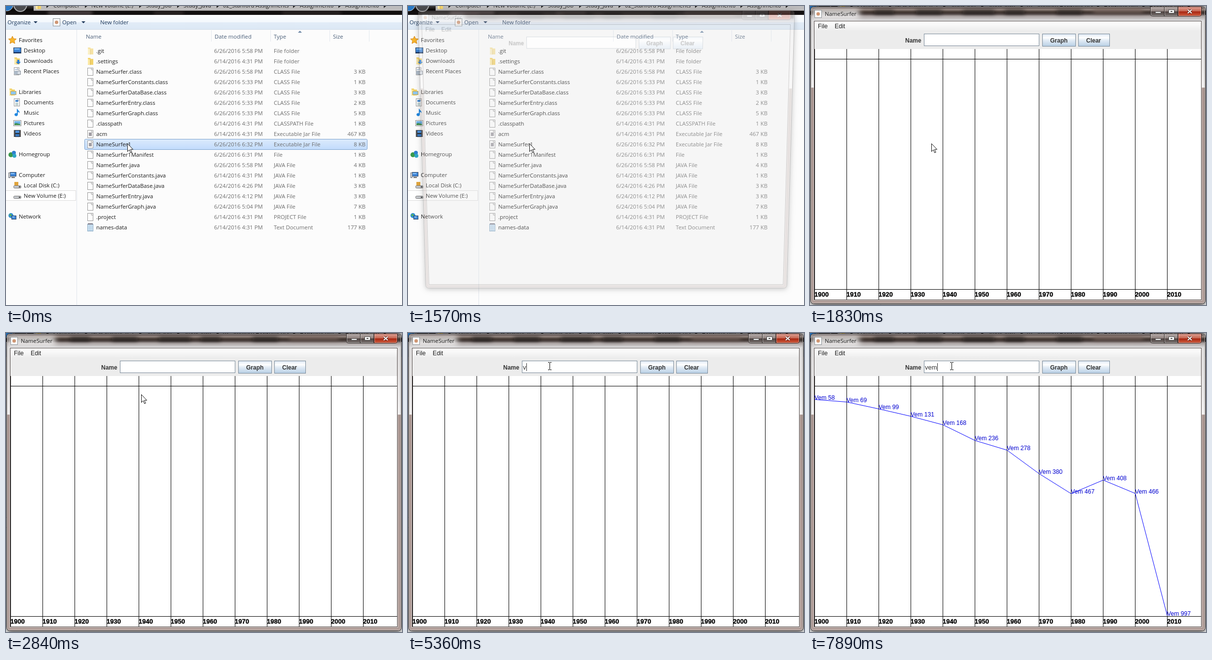
An HTML page that plays this animation: 803 px wide and 605 px high, repeating every 8000 ms.

```html
<!DOCTYPE html>
<html lang="en">
<head>
<meta charset="utf-8">
<title>Name graph</title>
<style>
html, body { margin: 0; width: 100%; height: 100%; overflow: hidden; background: #fcfcfc; }
svg { position: absolute; left: 0; top: 0; width: 803px; height: 605px; overflow: hidden; }
#win { overflow: visible; transform-origin: 401px 302px; filter: drop-shadow(0 2px 6px rgba(0,0,0,.75)); }
text { font: 11.3px "Open Sans", "Noto Sans", sans-serif; fill: #1c1c1c; white-space: pre; }
.dim { fill: #6d6d6d; }
.head { fill: #4c607a; }
.tool { fill: #1e395b; }
.java { font: 12.3px "Liberation Sans", Arial, sans-serif; }
.bold { font: bold 12px "Liberation Sans", Arial, sans-serif; fill: #333; }
.year { font: bold 13px "Liberation Sans", Arial, sans-serif; fill: #000; stroke: #000; stroke-width: .3; }
.rank { font: 12.2px "Liberation Sans", Arial, sans-serif; fill: #0000d0; }
.field { font: 13px "Liberation Sans", Arial, sans-serif; fill: #333; }
</style>
</head>
<body>
<svg id="desk" viewBox="0 0 803 605"></svg>
<svg id="win" viewBox="0 0 803 605"></svg>
<svg id="top" viewBox="0 0 803 605"></svg>
<script>
const LOOP = 8000;
const $ = id => document.getElementById(id);

const rect = (x, y, w, h, fill, more = '') =>
  `<rect x="${x}" y="${y}" width="${w}" height="${h}" fill="${fill}" ${more}/>`;
const box = (x, y, w, h, fill, line, more = '') =>
  rect(x + .5, y + .5, w - 1, h - 1, fill, `stroke="${line}" ${more}`);
const text = (x, y, s, cls = '', more = '') => `<text x="${x}" y="${y}" class="${cls}" ${more}>${s}</text>`;
const path = (d, fill, more = '') => `<path d="${d}" fill="${fill}" ${more}/>`;
const dot = (x, y, r, fill, more = '') => `<circle cx="${x}" cy="${y}" r="${r}" fill="${fill}" ${more}/>`;
const line = (d, color, w = 1, more = '') => path(d, 'none', `stroke="${color}" stroke-width="${w}" ${more}`);
const at = (x, y, s) => `<g transform="translate(${x} ${y})">${s}</g>`;
const grad = (id, ...stops) => `<linearGradient id="${id}" x2="0" y2="1">` +
  stops.map(([o, c]) => `<stop offset="${o}" stop-color="${c}"/>`).join('') + '</linearGradient>';
const blur = (id, r) =>
  `<filter id="${id}" x="-50%" y="-100%" width="200%" height="300%"><feGaussianBlur stdDeviation="${r}"/></filter>`;

// 16 px icons, drawn from their top left corner
const page = (w = 12) => box(1, 0, w, 16, '#fdfdfd', '#9a9a9a') + line(`M${w - 3} .5v3.5h3.5`, '#9a9a9a');
const folder = (c = '#f3d36b') => path('M2 1h5l1 2h5v12H2z', c) + path('M2 3l5 2v11l-5-2z', '#fbe9a5') +
  line('M7 5v10', '#d6ad45');
const screen = (x, y, w, h) => box(x, y, w, h, '#3f86d8', '#33475f') + rect(x + 2, y + 2, w - 6, 2, '#8cc4f5');
const drive = box(0, 8, 16, 6, '#c5c8cc', '#777', 'rx="2"') + rect(11, 10, 3, 2, '#3a3a3a');
const icons = {
  page: page(),
  folder: folder(),
  pale: `<g opacity=".6">${folder()}</g>`,
  jar: page() + rect(4, 5, 6, 7, '#a09da3'),
  notes: box(1, 1, 12, 15, '#dcecf8', '#7fa3c0') + line('M3 4.5h8M3 7.5h8M3 10.5h8M3 13.5h8', '#8db4d3') +
    line('M2 1h10', '#667', 2),
  star: path('M8 0l2.3 5 5.7.6-4.2 3.9 1.2 5.5-5-2.8-5 2.8 1.2-5.5L0 5.6 5.7 5z', '#f8b62c', 'stroke="#d98a1b"'),
  desktop: screen(0, 2, 16, 12) + rect(1, 11, 14, 2, '#1d3f77'),
  down: folder() + path('M8 6h4v4h3l-5 5-5-5h3z', '#2b7cd3'),
  recent: page(11) + line('M3 4.5h6M3 7.5h6', '#7ba0c8') + box(5, 7, 10, 8, '#d5dbe2', '#8a939c') + dot(5, 11, 4, '#aebac7'),
  library: folder() + box(4, 6, 12, 8, '#8fc6ee', '#d2a93f'),
  doc: page() + rect(4, 3, 6, 4, '#4b8cd0') + line('M4 9.5h6M4 11.5h6M4 13.5h6', '#8aa'),
  music: path('M8 0c1 4 6 4 4 9-1-3-3-3-3-3v6a3.4 3 0 1 1-2-3V0z', '#2187e0'),
  picture: box(0, 2, 16, 12, '#fff', '#8a8a8a') + rect(2, 4, 12, 8, '#6fb4e8') + path('M2 12v-3l4-1 8 2v2z', '#3d8a4a'),
  video: rect(1, 1, 14, 14, '#28292c') + rect(4, 2, 8, 5, '#4c8fd8') + rect(4, 9, 8, 5, '#3b78bd') +
    line('M2.5 2v13M13.5 2v13', '#ddd', 1, 'stroke-dasharray="1.5"'),
  group: dot(5, 9, 5, '#3b9a4b') + dot(11, 5, 4, '#2f7fd0') + dot(12, 11, 4, '#2ea6c4'),
  computer: screen(3, 2, 13, 9) + box(0, 3, 4, 11, '#d4d8dd', '#70757c') + rect(6, 12, 7, 2, '#666'),
  disk: rect(2, 1, 8, 7, '#e0a43c') + drive,
  drive,
  network: dot(5, 6, 5, '#2f8fd6') + dot(4, 5, 2.3, '#57b05a') + screen(6, 6, 10, 8)
};
const appIcon = box(0, 0, 15, 16, '#fafafa', '#8d9499') + dot(7.5, 8, 3.5, '#cf9673');

const side = [
  [0, 'star', 'Favorites'], [1, 'desktop', 'Desktop'], [2, 'down', 'Downloads'], [3, 'recent', 'Recent Places'],
  [5, 'library', 'Libraries'], [6, 'doc', 'Documents'], [7, 'music', 'Music'], [8, 'picture', 'Pictures'],
  [9, 'video', 'Videos'], [11, 'group', 'Homegroup'], [13, 'computer', 'Computer'],
  [14, 'disk', 'Local Disk (C:)'], [15, 'drive', 'New Volume (E:)'], [17, 'network', 'Network']
];
const roots = ['star', 'library', 'group', 'computer', 'network'];

// icon | name | day and time in June 2016 | type | KB
const files = `pale|.git|26 5:58|File folder
folder|.settings|14 4:31|File folder
page|NameSurfer.class|26 5:58|CLASS File|3
page|NameSurferConstants.class|26 5:33|CLASS File|1
page|NameSurferDataBase.class|26 5:33|CLASS File|3
page|NameSurferEntry.class|26 5:33|CLASS File|2
page|NameSurferGraph.class|26 5:33|CLASS File|5
page|.classpath|14 4:31|CLASSPATH File|1
jar|acm|14 4:31|Executable Jar File|467
jar|NameSurfer1|26 6:32|Executable Jar File|8
page|NameSurfer1Manifest|26 6:31|File|1
page|NameSurfer.java|26 5:58|JAVA File|4
page|NameSurferConstants.java|14 4:31|JAVA File|1
page|NameSurferDataBase.java|24 4:26|JAVA File|3
page|NameSurferEntry.java|24 4:12|JAVA File|3
page|NameSurferGraph.java|24 5:04|JAVA File|7
page|.project|14 4:31|PROJECT File|1
notes|names-data|14 4:31|Text Document|177`.split('\n').map(r => r.split('|'));

function explorer() {
  const crumbs = [[96, 'Computer'], [173, 'New Volume (E:)'], [284, 'Study_Job'], [360, 'Study_Java'],
    [440, '02_Stanford Assignments'], [596, 'Assignment6'], [688, 'Assignment6']];
  const arrow = x => path(`M${x} 31h8l-4 4z`, '#1e395b');
  let s = '<defs>' + grad('bar', [0, '#fcfdfe'], [.5, '#f3f8fd'], [.52, '#e2ecf7'], [1, '#dce8f5']) +
    grad('pick', [0, '#dcebfc'], [1, '#c1dbfc']) + grad('glass', [0, '#3c3a3b'], [.4, '#0b0909'], [1, '#161314']) +
    blur('soft', 3) + '</defs>';
  s += rect(0, 0, 803, 605, '#fcfcfc') + rect(0, 0, 803, 18, 'url(#glass)');
  s += `<g filter="url(#soft)">${rect(85, 12, 90, 4, '#77696a')}${rect(300, 13, 60, 3, '#4b3f40')}${rect(560, 13, 120, 3, '#453a3a')}</g>`;
  s += dot(2, -2, 12, '#2a78c4', 'stroke="#cfd6dd"') + dot(29, -2, 13, '#4b4c50', 'stroke="#a9abae" stroke-width="2"') +
    rect(56, -2, 747, 11, '#bdbcbd') + rect(56, 9, 747, 1, '#6a6768');
  s += at(58, -9, icons.folder);
  s += crumbs.map(([x, t]) => text(x, 3, t)).join('');
  s += [82, 160, 270, 347, 427, 582, 674, 766].map(x => path(`M${x}-4l5 4-5 4z`, '#222')).join('');
  s += rect(0, 18, 803, 29, 'url(#bar)') + rect(0, 47, 803, 1, '#cfdbe8');
  s += text(3, 37, 'Organize', 'tool') + arrow(56) + text(114, 37, 'Open', 'tool') + arrow(153) +
    text(191, 37, 'New folder', 'tool');
  s += at(95, 25, appIcon);

  s += rect(143, 48, 1, 557, '#e1e6ec') + box(-1, 373, 143, 21, '#fff', '#dcdcdc');
  for (const [n, icon, label] of side) {
    const y = 69 + 21 * n, root = roots.includes(icon);
    s += at(root ? 5 : 15, y - 8, icons[icon]) + text(root ? 26 : 36, y + 4, label);
  }
  [[162, 'Name'], [423, 'Date modified'], [543, 'Type'], [663, 'Size']].forEach(([x, t]) => s += text(x, 66, t, 'head'));
  [416, 536, 656, 736].forEach(x => s += rect(x, 49, 1, 23, '#e3e8ee'));
  s += path('M592 54l4-4 4 4z', '#6d87a5');
  s += `<g id="selected">${box(159, 269, 574, 22, 'url(#pick)', '#7da2ce', 'rx="2"')}</g>`;
  files.forEach(([icon, name, when, type, kb], i) => {
    const y = 91 + 21 * i, [day, hour] = when.split(' ');
    s += at(164, y - 8, icons[icon]) + text(183, y + 4, name) +
      text(422, y + 4, `6/${day}/2016 ${hour} PM`, 'dim') + text(543, y + 4, type, 'dim');
    if (kb) s += text(729, y + 4, kb + ' KB', 'dim', 'text-anchor="end"');
  });
  return s;
}

const ranks = [58, 69, 99, 131, 168, 236, 278, 380, 467, 408, 466, 997];
const colX = i => 9 + 65 * i;
const rankY = r => 107.5 + r * .466;

function appWindow() {
  const button = (x, w, label, tx) => box(x, 56, w, 26, 'url(#btn)', '#7a8a99') + text(tx, 74, label, 'bold');
  let s = '<defs>' +
    grad('title', [0, '#4a4140'], [.18, '#93857f'], [.36, '#40352f'], [.5, '#4a403e'], [.66, '#aaa2a1'], [1, '#dcdcde']) +
    grad('btn', [0, '#dde8f3'], [.3, '#fff'], [.5, '#e4edf6'], [1, '#b8cfe5']) +
    grad('ctl', [0, '#b9afad'], [.48, '#8e817e'], [.5, '#4c403e'], [1, '#77706e']) +
    grad('close', [0, '#dfa396'], [.48, '#c4634f'], [.5, '#a62511'], [1, '#cf5a3a']) +
    grad('menu', [0, '#fff'], [1, '#ececec']) +
    grad('edge', [0, '#d8d6d6'], [.2, '#e6e4e4'], [.272, '#f0eeee'], [.273, '#a8948f'], [1, '#b09d98']) +
    blur('haze', 4) + blur('glow', 6) +
    '<clipPath id="cap"><rect x="2" y="2" width="799" height="28" rx="5"/></clipPath></defs>';
  s += box(1, 1, 801, 602, 'url(#edge)', '#1f1b1b', 'rx="6"');
  s += `<g clip-path="url(#cap)">${rect(2, 2, 799, 28, 'url(#title)')}<g filter="url(#haze)">` +
    [130, 215, 310, 395, 500].map((x, i) => rect(x, 9, 40 + 12 * (i % 3), 7, '#120c0b', 'opacity=".7"')).join('') +
    rect(575, 3, 100, 12, '#77645f', 'opacity=".7"') + '</g>' +
    `<g filter="url(#glow)">${rect(4, 7, 96, 18, '#fff', 'opacity=".85"')}</g></g>`;
  s += box(2, 2, 799, 600, 'none', '#fff', 'rx="5" stroke-opacity=".5"');
  s += box(7, 29, 788, 567, 'none', '#fff', 'stroke-opacity=".55"');
  s += box(8, 30, 786, 565, 'none', '#4c4341');
  s += at(9, 8, appIcon);
  s += text(30, 20, 'NameSurfer');

  s += path('M690.5 1.5v15q0 4 4 4h51.5v-19z', 'url(#ctl)', 'stroke="#2e2826"') + line('M718.5 2v18', '#2e2826') +
    path('M746.5 1.5v19h43q4 0 4-4v-15z', 'url(#close)', 'stroke="#3a1510"') +
    line('M691.5 2v15q0 2.5 3 2.5h23M719.5 2v17.5h26M747.5 2v17.5h42q3 0 3-3v-14', 'rgba(255,255,255,.45)');
  s += box(700, 11, 12, 4, '#fff', '#555') + box(727, 7, 12, 8, '#fff', '#555') + rect(731, 10, 4, 2, '#555');
  s += line('M766 7.5l8 7M774 7.5l-8 7', '#55201a', 4) + line('M766 7.5l8 7M774 7.5l-8 7', '#fff', 2.2);

  s += `<rect id="client" x="9" y="31" width="784" height="563"/>`;
  s += `<g id="panel">${rect(9, 31, 784, 20, 'url(#menu)')}${rect(9, 51, 784, 36, '#ececec')}</g>`;
  s += text(16, 45, 'File', 'java') + text(50, 45, 'Edit', 'java') + text(193, 74, 'Name', 'bold');
  s += box(231, 56, 234, 25, '#fff', '#7a8a99') + button(471, 68, 'Graph', 487) + button(544, 64, 'Clear', 560);

  s += '<g id="graph">' + rect(9, 107, 784, 1, '#000') + rect(9, 573, 784, 1, '#000');
  ranks.forEach((r, i) => {
    s += rect(colX(i), 87, 1, 507, '#000') + text(colX(i), 588, 1900 + 10 * i, 'year');
  });
  s += '</g><g id="plot">' +
    line('M' + ranks.map((r, i) => `${colX(i) + .5} ${rankY(r)}`).join('L'), '#0000ff') +
    ranks.map((r, i) => text(colX(i), Math.round(rankY(r)), 'Vem ' + r, 'rank')).join('') + '</g>';
  s += text(233, 74, '', 'field', 'id="typed"') + rect(233, 61, 1, 16, '#333', 'id="caret"');
  return s;
}

$('desk').innerHTML = explorer();
$('win').innerHTML = appWindow();
$('top').innerHTML =
  path('M.5.5v16l3.7-3.5 2.6 6 2.4-1-2.6-5.8h5z', '#fff', 'id="arrow" stroke="#111"') +
  `<g id="beam">${line('M-3.5-7.5h3M.5-7.5h3M-3.5 7.5h3M.5 7.5h3M0-7v14', '#000')}</g>`;

// opening steps: time, tilt, opacity
const opening = [[0, 1.3, 0], [1450, 1.3, .08], [1570, 1, .28], [1710, .34, .87], [1830, 0, 1]];
const arrowAt = [[0, 246, 278], [2700, 243, 231], [2840, 274, 124], [2990, 279, 90]];
const beamAt = [[3110, 289.5, 80], [3260, 289.5, 78], [3520, 288.5, 75], [3660, 287.5, 67]];
const typing = [[0, '', 233], [5360, 'v', 240], [5610, 've', 247], [6040, 'vem', 258]];
const blinks = [3970, 4530, 5060, 6470, 6900, 7470, 7890];

const current = (steps, t) => steps.filter(s => s[0] <= t).pop() || steps[0];
const show = (id, on) => $(id).style.display = on ? '' : 'none';
const move = (id, [, x, y]) => $(id).setAttribute('transform', `translate(${x} ${y})`);

// perspective that narrows towards the bottom as tilt grows
function lean(tilt) {
  if (!tilt) return 'none';
  const w = 1 / (1 - .066 * tilt), slope = 6.66e-5 * tilt * w * w;
  return `translate(.6px, ${-6 * tilt ** 1.5}px) matrix3d(1,0,0,0, 0,1,0,${slope}, 0,0,1,0, 0,0,0,${w})`;
}

function draw(t) {
  const [, tilt, alpha] = current(opening, t);
  $('win').style.opacity = alpha;
  $('win').style.transform = lean(tilt);
  show('win', alpha > 0);
  show('selected', t < 1450);
  show('graph', tilt < 1);
  show('panel', tilt === 0);
  $('client').setAttribute('fill', tilt < 1 ? '#fff' : '#e6e6e6');

  const [, word, caretX] = current(typing, t);
  $('typed').textContent = word;
  $('caret').setAttribute('x', caretX);
  show('caret', blinks.filter(b => b <= t).length % 2);
  show('plot', t >= 7180);

  move('arrow', current(arrowAt, t));
  move('beam', current(beamAt, t));
  show('arrow', t < 3110);
  show('beam', t >= 3110);
}

let start;
function tick(now) {
  start ??= now;
  draw((now - start) % LOOP);
  requestAnimationFrame(tick);
}
draw(0);
requestAnimationFrame(tick);
</script>
</body>
</html>
```
